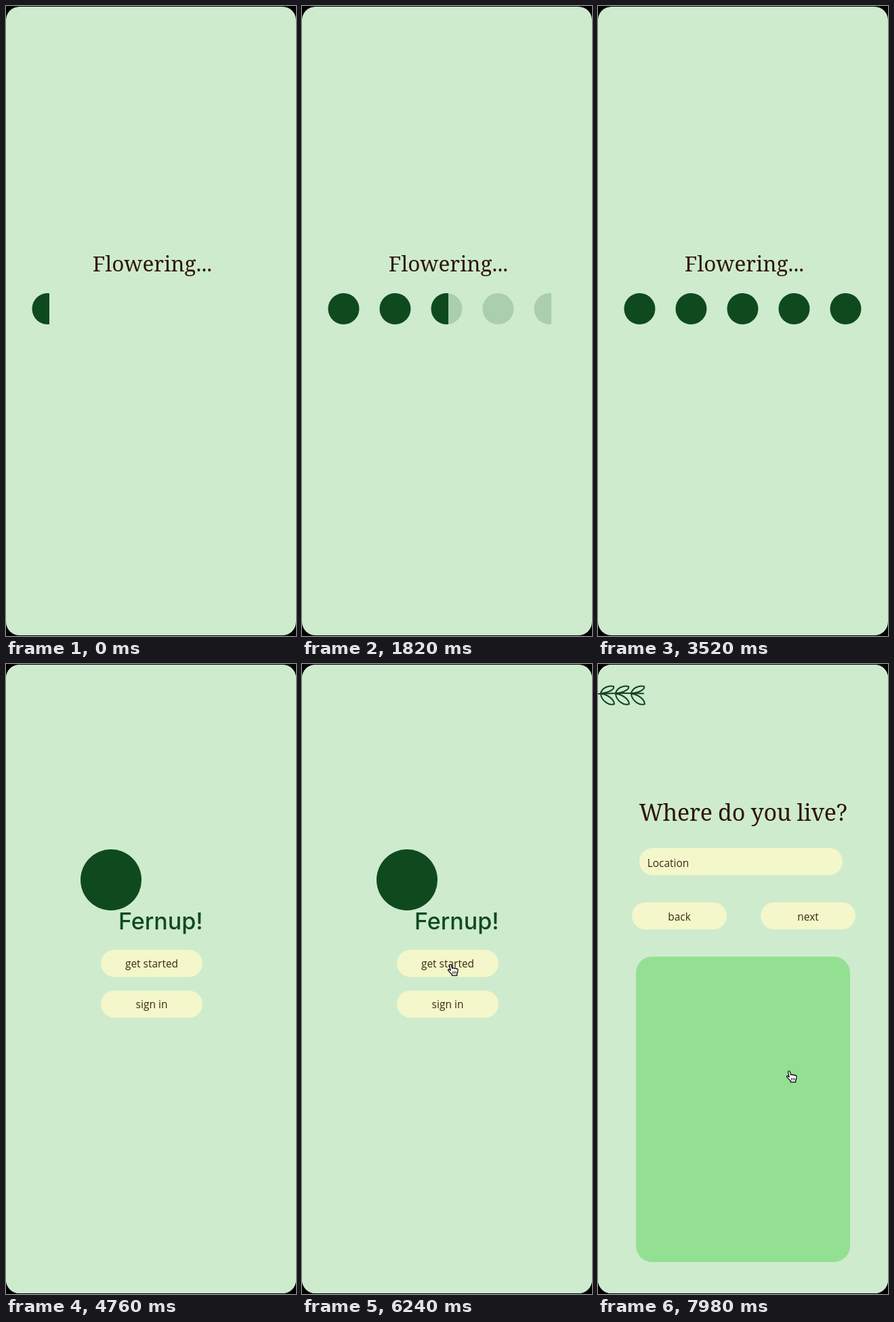
Animation, 428 px wide and 928 px high, one loop 8000 ms. Source, as an HTML page:

```html
<!DOCTYPE html>
<html lang="en">
<head>
<meta charset="utf-8">
<title>Fernup</title>
<style>
  html, body { margin: 0; height: 100%; overflow: hidden; background: #000; }
  svg { display: block; width: 428px; height: 928px; }
  .serif { font-family: "Noto Serif", serif; fill: #2e1607; text-anchor: middle; }
  .label { font: 15.5px "Open Sans", sans-serif; fill: #3a2913; text-anchor: middle; }
  .brand { font: 500 34px Inter, sans-serif; fill: #0f4a1e; }
  .leaf { fill: none; stroke: #124325; stroke-width: 2; stroke-linecap: round; stroke-linejoin: round; }
  .btn { fill: #f4f7ca; }
  .page { fill: #ceebce; }
</style>
</head>
<body>
<svg viewBox="0 0 428 928">
  <defs>
    <rect id="page" class="page" y="1" width="428" height="926" rx="20"/>
    <g id="twig" class="leaf">
      <path d="M4 43C6 35 16 31 23 33C25 37 15 43 4 43Z"/>
      <path d="M4 44C13 44 24 52 24 59C16 62 5 54 4 44Z"/>
    </g>
  </defs>

  <g id="loading">
    <use href="#page"/>
    <text class="serif" x="216" y="391" font-size="31.5">Flowering...</text>
    <g id="dots" fill="#0f4a1e"></g>
  </g>

  <g id="start">
    <use href="#page"/>
    <circle cx="155" cy="318" r="45" fill="#0f4a1e"/>
    <text class="brand" x="166" y="391">Fernup!</text>
    <rect class="btn" x="140" y="421" width="150" height="40" rx="20"/>
    <rect class="btn" x="140" y="481" width="150" height="40" rx="20"/>
    <text class="label" x="215" y="447">get started</text>
    <text class="label" x="215" y="507">sign in</text>
  </g>

  <g id="place">
    <use href="#page"/>
    <path class="leaf" d="M0 44Q35 42.500 67 43.500"/>
    <use href="#twig"/>
    <use href="#twig" x="22"/>
    <use href="#twig" x="45"/>
    <text class="serif" x="214" y="231" font-size="34" letter-spacing="-.3">Where do you live?</text>
    <rect class="btn" x="61" y="271" width="300" height="40" rx="20"/>
    <rect class="btn" x="50" y="351" width="140" height="40" rx="20"/>
    <rect class="btn" x="240" y="351" width="140" height="40" rx="20"/>
    <text class="label" x="103.500" y="299">Location</text>
    <text class="label" x="120" y="378">back</text>
    <text class="label" x="310" y="378">next</text>
    <rect x="56" y="431" width="316" height="450" rx="24" fill="#94e092"/>
  </g>

  <g id="cursor">
    <path id="arrow" d="M0 0V14.500L3.300 11.500L5.600 17L8.200 15.900L5.900 10.600H10.300Z"
      fill="#000" stroke="#fff" stroke-width="1.200" stroke-linejoin="round"/>
    <g id="hand" fill="#fff" stroke="#000" stroke-width="1.200" stroke-linejoin="round" stroke-linecap="round">
      <path d="M-1.500 1C-1.500-1 1-1 1.500 1L2.700 5.500C3.200 4.300 5.300 4.300 5.700 5.800C6.500 4.800 8.200 5 8.600 6.300C9.800 5.500 11 6.200 11.100 7.500C11.300 10.500 10.500 12 9.800 13.200V15.800H2.200V14C0 12-2 10-3.300 8.300C-4 7-2.300 6.200-1.200 7.200L.2 8.500Z"/>
      <path d="M3.600 10V13M5.900 10V13M8.100 10V13" fill="none" stroke-width=".9"/>
    </g>
  </g>
</svg>
<script>
const $ = id => document.getElementById(id);
const clamp = v => Math.max(0, Math.min(1, v));
const ramp = (t, a, b) => clamp((t - a) / (b - a));
const smooth = k => k * k * (3 - 2 * k);

// Five dots, each split into a left and a right part that appear separately.
const halves = [];
for (let h = 0; h < 10; h++) {
  const p = document.createElementNS("http://www.w3.org/2000/svg", "path");
  const arc = h % 2 ? "0 0 1" : "0 1 0";
  p.setAttribute("d", `M0-22.86A23 23 ${arc} 0 22.86Z`);
  p.setAttribute("transform", `translate(${64 + 76 * (h >> 1)} 446)`);
  $("dots").append(p);
  halves.push(p);
}
const reveals = [[-2, -1], [0, 860], [1670, 2500], [2860, 3520]];

// Pointer stops: time, x, y
const stops = [
  [5250, 430, 590], [5740, 284, 490], [6100, 219, 443], [7060, 219, 443],
  [7240, 226, 359], [7360, 232, 362], [7840, 282, 600], [8000, 282, 600]
];
// Clickable areas: x, y, width, height
const startAreas = [[140, 421, 150, 40], [140, 481, 150, 40]];
const placeAreas = [[61, 271, 300, 40], [50, 351, 140, 40], [240, 351, 140, 40], [56, 431, 316, 450]];

function pointerAt(t) {
  const i = Math.max(1, stops.findIndex(s => s[0] > t));
  const [a, b] = [stops[i - 1], stops[i]];
  const k = smooth(ramp(t, a[0], b[0]));
  return [a[1] + (b[1] - a[1]) * k, a[2] + (b[2] - a[2]) * k];
}

function draw(t) {
  halves.forEach((p, h) => p.setAttribute("opacity", ramp(t, ...reveals[Math.ceil(h / 4)])));
  $("start").setAttribute("opacity", ramp(t, 4090, 4740));
  $("place").setAttribute("opacity", ramp(t, 6550, 6900));

  const [x, y] = pointerAt(t);
  const areas = t < 6700 ? startAreas : placeAreas;
  const over = areas.some(([l, u, w, h]) => x >= l && x <= l + w && y >= u && y <= u + h);
  $("cursor").setAttribute("transform", `translate(${x} ${y})`);
  $("cursor").setAttribute("visibility", t < stops[0][0] ? "hidden" : "visible");
  $("arrow").setAttribute("opacity", over ? 0 : 1);
  $("hand").setAttribute("opacity", over ? 1 : 0);
}

const begin = performance.now();
function tick() {
  draw((performance.now() - begin) % 8000);
  requestAnimationFrame(tick);
}
tick();
</script>
</body>
</html>
```
